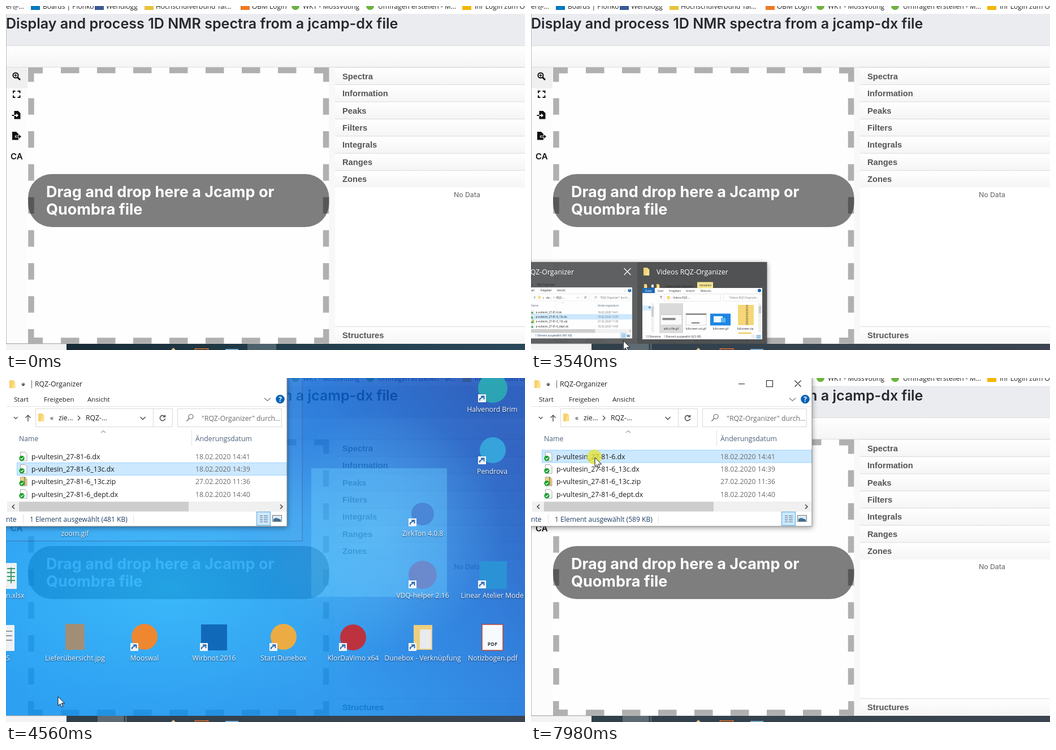
Recreate the animation shown at these times as an HTML page. Size 918 by 610 pixels, loop 8000 ms.

```html
<!DOCTYPE html>
<html lang="en">
<head>
<meta charset="utf-8">
<title>Opening a spectrum file</title>
<style>
html, body { margin: 0; width: 100%; height: 100%; overflow: hidden; background: #fff; }
svg { display: block; width: 918px; height: 610px; }
text { font-family: "Open Sans", "Noto Sans", sans-serif; white-space: pre; }
.head { font-family: Inter, sans-serif; font-weight: 600; }
.drop { font-family: Inter, sans-serif; font-weight: 700; }
.panel { font-family: "Liberation Sans", Arial, sans-serif; font-weight: bold; }
.label { text-shadow: 0 1px 2px rgba(0,20,50,.8); }
.shadow { filter: drop-shadow(0 2px 5px rgba(0,0,0,.4)); }
</style>
</head>
<body>
<svg id="stage" viewBox="0 0 918 610" xmlns="http://www.w3.org/2000/svg"></svg>
<script>
const LOOP = 8000;
const APP = 'RQZ-Organizer';
const FILE = 'p-vultesin_27-81-6';

// Drawing helpers
const rect = (x, y, w, h, fill, more = '') =>
  `<rect x="${x}" y="${y}" width="${w}" height="${h}" fill="${fill}" ${more}/>`;
const dot = (x, y, r, fill, more = '') => `<circle cx="${x}" cy="${y}" r="${r}" fill="${fill}" ${more}/>`;
const text = (x, y, s, size = 12.25, fill = '#222', more = '') =>
  `<text x="${x}" y="${y}" font-size="${size}" fill="${fill}" ${more}>${s}</text>`;
const line = (d, color = '#444', width = 1, more = '') =>
  `<path d="${d}" fill="none" stroke="${color}" stroke-width="${width}" ${more}/>`;
const shape = (d, fill, more = '') => `<path d="${d}" fill="${fill}" ${more}/>`;
const group = (id, body, more = '') => `<g id="${id}" ${more}>${body}</g>`;
const gradient = (id, stops, [x1, y1, x2, y2] = [0, 0, 1, 0]) =>
  `<linearGradient id="${id}" x1="${x1}" y1="${y1}" x2="${x2}" y2="${y2}">` +
  stops.map(([at, c]) => `<stop offset="${at}" stop-color="${c}"/>`).join('') + '</linearGradient>';
const glow = (id, color, opacity) => `<radialGradient id="${id}"><stop offset="0" stop-color="${color}" ` +
  `stop-opacity="${opacity}"/><stop offset="1" stop-color="${color}" stop-opacity="0"/></radialGradient>`;

const defs = '<defs>' +
  gradient('bar', [[0, '#ffffff'], [1, '#f5f5f5']], [0, 0, 0, 1]) +
  gradient('task', [[0, '#142631'], [.5, '#213c49'], [1, '#29485a']]) +
  gradient('taskGrey', [[0, '#2e3f4a'], [.5, '#35434f'], [1, '#3b4450']]) +
  gradient('sky', [[0, '#008cf0'], [.45, '#0785ea'], [.75, '#0666d6'], [1, '#0846b6']], [0, .75, 1, .25]) +
  glow('cyanGlow', '#14b6ff', .75) + glow('lampGlow', '#5cc8ff', .45) + '</defs>';

function bookmarks() {
  const items = [
    [52, '#0079bf', 65, 'Boards | Plonko'], [165, '#3b5998', 177, 'Wendlogg'],
    [253, '#e9c33c', 265, 'Hochschulverbund Tal...'], [423, '#f07a24', 435, 'OBM Login'],
    [512, '#6cb33f', 525, 'WKT - MossVoting', 1], [644, '#6cb33f', 658, 'Umfragen erstellen - M...', 1],
    [815, '#f2b700', 829, 'Ihr Login zum O...']];
  return text(0, 5, 'er@...', 12) + items.map(([cx, color, x, label, round]) =>
    (round ? dot(cx, 0, 7, color) : rect(cx - 8, -9, 16, 16, color)) + text(x, 5, label, 12)).join('');
}

function dropFrame() {
  const c = '#b0b0b0';
  let s = rect(39, 109, 532, 489, '#fefefe');
  for (const y of [114, 593.5]) s += line(`M97 ${y}H514`, c, 10.5, 'stroke-dasharray="32.5 31.5"');
  for (const x of [44.5, 566]) s += line(`M${x} 163.5V545`, c, 10.5, 'stroke-dasharray="29.2 29.3"');
  for (const x of [39, 545]) for (const y of [109, 588]) s += rect(x, y, 26, 10.5, c);
  for (const x of [39, 561]) for (const y of [109, 573]) s += rect(x, y, 10.5, 25.5, c);
  return s + rect(39, 298, 532.5, 94, '#000', 'rx="42" opacity=".5"') +
    text(71, 339, 'Drag and drop here a Jcamp or', 27, '#fff', 'class="drop"') +
    text(71, 370, 'Quombra file', 27, '#fff', 'class="drop"');
}

function sideTools() {
  const k = '#111';
  const sheet = (x, y) => shape(`M${x} ${y - 7}h7l4 4v10.5h-11z`, k);
  return rect(0, 109, 38, 490, '#fcfcfc') + rect(0, 109, 38, 37, '#f0f0f0') +
    dot(17, 123, 4.6, 'none', `stroke="${k}" stroke-width="2"`) +
    line('M20.5 126.5L25 131', k, 2.8) + line('M14.6 123H19.4M17 120.6V125.4', k, 1.3) +
    line('M13 154.5V151H16.5M20.5 151H24.5V154.5M24.5 158.5V162H20.5M16.5 162H13V158.5', k, 2.1) +
    sheet(14.5, 193) + line('M10.5 194H15', k, 2) + line('M14.5 194H19', '#fff', 2) + shape('M18 190.5l4 3.5-4 3.5z', '#fff') +
    sheet(11, 230) + line('M16 231.5H24', '#fff', 3.6) + line('M17 231.5H24', k, 1.8) + shape('M23 228l4 3.5-4 3.5z', k) +
    text(8, 271.5, 'CA', 15, k, 'class="head"');
}

function page() {
  const titles = ['Spectra', 'Information', 'Peaks', 'Filters', 'Integrals', 'Ranges', 'Zones'];
  const header = (y, s) => rect(582, y, 336, 30, 'url(#bar)') + line(`M582 ${y}H918`, '#d9d9d9') +
    text(595, y + 20.6, s, 14.7, '#555', 'class="panel"');
  return rect(0, 0, 918, 610, '#fff') + bookmarks() +
    rect(0, 14, 918, 56, '#ebecf0') + text(0, 40, 'Display and process 1D NMR spectra from a jcamp-dx file', 25.1, '#26282e', 'class="head"') +
    rect(0, 70, 918, 39, 'url(#bar)') + line('M0 70.5H918M0 108.5H918', '#dcdcde') +
    sideTools() + rect(571, 109, 11, 490, '#f8f8f8') + dropFrame() +
    titles.map((s, i) => header(109 + 30.45 * i, s)).join('') +
    text(815.5, 338.5, 'No Data', 12.3, '#777', 'text-anchor="middle" style="font-family:Inter,sans-serif;font-weight:500"') +
    header(568.7, 'Structures') + line('M.5 14V599', '#bbb');
}

const wallpaper = () => rect(0, 0, 918, 600, 'url(#sky)') +
  rect(-150, 130, 880, 480, 'url(#cyanGlow)') + rect(440, 60, 440, 420, 'url(#lampGlow)') +
  rect(540, 160, 240, 228, '#4cc4ff', 'opacity=".4"') +
  rect(-2, -2, 526, 291, '#fff', 'fill-opacity=".05" stroke="#0b4d92" stroke-opacity=".55" stroke-width="1.5"');

function desktopIcons() {
  const label = (x, y, s) => text(x, y, s, 12.2, '#fff', 'text-anchor="middle" class="label"');
  const sheet = (x, y, w, fill = '#f4f4f4', more = '') => rect(x, y, w, 46, fill, 'rx="1" ' + more);
  const apps = [
    [860, 60, 'Halvenord Brim', dot(861, 18, 26, '#2ca7b4')],
    [860, 170, 'Pendrova', dot(861, 128, 23, '#37a5dc')],
    [737, 280, 'ZirkTon 4.0.8', dot(737, 241, 20, '#4a86d6')],
    [737, 390, 'VDQ-helper 2.16', dot(737, 349, 25, '#6c88cc')],
    [860, 390, 'Linear Atelier Mode', rect(837, 325, 49, 49, '#2b93d6')],
    [245, 501, 'Mooswal', dot(245, 459, 23, '#f5862b')],
    [368, 501, 'Wirbnot 2016', rect(345, 437, 46, 46, '#0f68b8')],
    [491, 501, 'Start Dunebox', dot(491, 459, 23, '#f2ad3e')],
    [614, 501, 'KlorDaVimo x64', dot(614, 460, 23, '#c12f3a')],
    [737, 501, 'Dunebox - Verknüpfung', rect(721, 438, 33, 44, '#f3d27c') + rect(732, 446, 20, 34, '#eee')]];
  const shortcut = (x, y) => rect(x, y, 14, 14, '#f8f8f8') +
    line(`M${x + 3} ${y + 11}V${y + 8}L${x + 9} ${y + 4.5}M${x + 5} ${y + 3.5}H${x + 10.5}V${y + 9}`, '#1d5fae', 1.8);
  return apps.map(([x, y, s, icon]) => icon + shortcut(x - 25, y - 31) + label(x, y, s)).join('') +
    label(122, 280, 'zoom.gif') + sheet(-20, 328, 39) +
    line('M2 338H16M2 345H16M2 352H16M2 359H16M9 336V364', '#3d9a63', 2) + text(0, 390, 'n.xlsx', 12.2, '#fff', 'class="label"') +
    sheet(-20, 438, 35) + line('M0 449H11M0 457H11M0 465H11', '#999', 2) + text(0, 501, 'S', 12.2, '#fff', 'class="label"') +
    sheet(105, 436, 34, '#a68e73') + label(122, 501, 'Lieferübersicht.jpg') +
    sheet(842, 437, 37, '#fff', 'stroke="#c8402f" stroke-width="1.5"') +
    text(860.5, 475, 'PDF', 9, '#333', 'text-anchor="middle" font-weight="bold"') + label(861, 501, 'Notizbogen.pdf');
}

const folder = (x, y, s = 1) => `<g transform="translate(${x} ${y}) scale(${s})">` +
  shape('M0 0h7l3 3v11H0z', '#f7d16f') + shape('M7 3h3.5v11H4z', '#fbe08f') + '</g>';

function explorer() {
  const grey = '#6d6d6d', blue = '#4c607a';
  const rows = [['.dx', '18.02.2020 14:41'], ['_13c.dx', '18.02.2020 14:39'],
    ['_13c.zip', '27.02.2020 11:36'], ['_dept.dx', '18.02.2020 14:40']];
  const row = ([end, date], i) => {
    const y = 139.5 + 22.1 * i, zip = end.endsWith('zip');
    return shape(`M25.5 ${y - 8}h8l3.5 3.5v12h-11.5z`, zip ? '#f4d273' : '#fff', 'stroke="#a5a5a5"') +
      (zip ? line(`M33 ${y - 8}v15`, '#777', 2.4, 'stroke-dasharray="2 1"') : '') +
      dot(28, y + 3, 4.7, '#16a02c') + line(`M25.8 ${y + 3}l1.7 1.8 3-3.4`, '#fff', 1.3) +
      text(45, y + 4.7, FILE + end, 12.25, '#1a1a1a') + text(335, y + 4.7, date, 12.25, grey);
  };
  return rect(-4, 23, 501, 240, '#fff') + folder(6, 4) +
    shape('M27 11h7l-3.5 3.5z', '#333') + line('M28 9.5H33', '#333') + line('M45.5 4V18', '#666') + text(51, 15, APP) +
    text(14, 42, 'Start', 11.6) + text(67, 42, 'Freigeben', 11.6) + text(144, 42, 'Ansicht', 11.6) +
    line('M457 35.5l5.5 5 5.5-5', '#777', 1.2) + dot(485, 37.5, 7.8, '#0a64b4') +
    text(485, 42, '?', 12, '#fff', 'text-anchor="middle" font-weight="bold"') +
    line('M0 50.5H497', '#e2e2e2') +
    line('M14 69l3.3 3.3 3.3-3.3', '#555', 1.4) + line('M39 77V66M34.5 70.5L39 66l4.5 4.5', '#555', 1.5) +
    line('M52.5 54.5H294.5V86.5H52.5ZM260.5 54.5V86.5M303.5 54.5H487.5V86.5H303.5Z', '#d9d9d9') +
    folder(57, 63) + text(78, 75, '«', 12) + text(93, 75, 'zie...') + line('M127 67l4 4-4 4', '#444', 1.3) + text(141, 75, 'RQZ-...') +
    line('M237.5 69l4.5 4.5 4.5-4.5', '#444', 1.4) + line('M280.5 68a4.6 4.6 0 1 0 1 4M281.5 65.5v3.5h-4', '#555', 1.6) +
    dot(327, 68.5, 4, 'none', 'stroke="#666" stroke-width="1.2"') + line('M324 71.5L319.5 76.5', '#666', 1.3) +
    text(346, 76, `"${APP}" durch...`, 12.2, grey) +
    line('M168 97l4-3.5 4 3.5', '#666') + text(23, 112, 'Name', 12.25, blue) +
    line('M328.5 92V121', '#e2e2e2') + text(335, 112, 'Änderungsdatum', 12.25, blue) +
    rect(19.5, 0, 477, 22, '#e5f3ff', 'class="hover"') +
    rect(19.5, 0, 477, 22, '#cce8ff', 'class="picked" stroke="#99d1ff"') +
    rows.map(row).join('') +
    rect(2, 219, 494, 18, '#f0f0f0') + rect(23, 219.5, 300, 17, '#cdcdcd') +
    line('M15 224.5l-4 3.7 4 3.7M485 224.5l4 3.7-4 3.7', '#444', 1.5) +
    text(0, 255, 'nte', 12.1, '#1f3f63') + text(42, 255, '1 Element ausgewählt (481 KB)', 12.1, '#1f3f63', 'class="status"') +
    line('M30.5 242V258M225.5 242V258', '#e2e2e2') +
    rect(443.5, 237.5, 24, 24, '#cce8ff', 'stroke="#5aa9dd"') +
    line('M449 244.5H454M456 244.5H463M449 248H454M456 248H463M449 251.5H454M456 251.5H463M449 255H454M456 255H463', '#5b6b78', 1.2) +
    rect(471.5, 243.5, 16, 11, '#dcebf7', 'stroke="#777"') + shape('M473 250l5-2 8 3v3H473z', '#3f6f96');
}

function gallery() {
  const tiny = (x, y, s, fill = '#333', size = 4.6) => text(x, y, s, size, fill);
  const names = ['add a file.gif', 'fullscreen out.gif', 'fullscreen.gif', 'fullscreen.zip'];
  return rect(197, 500, 212, 91, '#fff') +
    folder(200, 493, .5) + rect(213, 494, 4, 5, '#eee') + folder(222, 493, .5) + tiny(236, 499, '| Videos ' + APP, '#222') +
    rect(294, 489.5, 28, 11, '#f5e58c') + tiny(298, 497, 'Verwalten') +
    rect(197, 500, 22, 9, '#1966b3') + tiny(202, 506.5, 'Datei', '#fff') +
    tiny(224, 506.5, 'Start') + tiny(244, 506.5, 'Freigeben') + tiny(274, 506.5, 'Ansicht') + tiny(300, 506.5, 'Bildtools') +
    dot(404, 504.5, 3, '#0a64b4') + line('M197 510.5H409', '#e2e2e2', .6) +
    line('M230 519.5V514M228 516l2-2 2 2', '#555', .7) + line('M235.5 510.5H335.5V523.5H235.5ZM340.5 510.5H407.5V523.5H340.5Z', '#ddd', .6) +
    folder(241, 514, .45) + tiny(249, 519, '› Videos RQZ-...') + tiny(350, 519, `"Videos ${APP}...`, '#777') +
    rect(197, 531, 21, 9, '#d6ebfb') + shape('M207 533h5l-2 4z', '#3b8ad0') + rect(212.5, 527, 5, 52, '#f0f0f0') + rect(213, 533, 4, 18, '#cdcdcd') +
    rect(227, 527, 42, 53, '#d9d9d9') + rect(230, 546, 36, 19, '#fafafa') + rect(232, 553, 24, 4, '#888', 'rx="2"') + line('M230 547H266', '#aaa', 1.2) +
    rect(274, 545, 36, 21, '#fdfdfd', 'stroke="#bbb" stroke-width=".6"') + line('M274 546.5H310', '#444', 1.6) + rect(284, 561, 14, 2, '#777') +
    rect(317, 545.5, 36, 21, '#1683e4') + rect(323, 550, 16, 11, '#f2f8ff') + rect(336, 553, 8, 8, '#58b3f5') +
    rect(366, 530, 28, 36, '#f6d574') + line('M382 530V566', '#a8924a', 4, 'stroke-dasharray="2 1.2"') +
    names.map((s, i) => text(248 + 43.7 * i, 573.5, s, 4.7, '#222', 'text-anchor="middle"')).join('') +
    line('M367 580H390', '#f0c54a', 2) + rect(402, 527, 6, 52, '#f0f0f0') + rect(402.5, 532, 5, 13, '#cdcdcd') +
    tiny(203, 587.5, '13 Elemente') + tiny(235, 587.5, '1 Element ausgewählt (623 KB)') +
    rect(389.5, 583, 7, 7, '#eee') + rect(398.5, 583, 8, 7, '#9cc9ea');
}

const popup = () => rect(-8, 454, 425.5, 150, '#4b4d4e', 'class="shadow"') +
  rect(0, 454, 188, 145, '#fff', 'id="popupHover" opacity=".08"') +
  text(-9, 476, APP, 12.4, '#fff') +
  line('M164.5 465l12 12M176.5 465l-12 12', '#fff', 1.3, 'id="popupClose"') +
  folder(199, 464, .98) + text(222, 476, 'Videos ' + APP, 12.4, '#fff') +
  '<use href="#explorer" transform="translate(-8.4 490.3) scale(.377)"/>' + gallery();

const taskbar = () => rect(0, 599, 918, 11, 'url(#task)', 'id="taskBase"') +
  rect(427, 599, 51, 11, '#fff', 'id="taskActive" opacity=".2"') +
  rect(162, 599, 46.5, 11, '#fff', 'id="taskHover"') + rect(211, 599, 2.5, 11, '#fff', 'id="taskStack" opacity=".2"') +
  rect(0, 599, 107, 11, '#f3f3f3') + line('M0 598.8H107', '#999') +
  shape('M292 610l4-4 4 4z', '#e2c290') + line('M334.5 610V607.7H357.5V610', '#e8702a', 1.6) + rect(388, 608.3, 23, 2, '#86bfe8');

const stage = document.getElementById('stage');
stage.innerHTML = defs + page() + group('wallpaper', wallpaper()) + group('icons', desktopIcons()) +
  group('window', rect(-4, -4, 501, 30, '#fff') + group('explorer', explorer()) +
    group('buttons', line('M367 10.5H378M416.5 4.5H427.5V15.5H416.5ZM466.5 4.5l11 11M477.5 4.5l-11 11', '#222', 1.1)) +
    line('M497 0V263H0', '#8c8c8c', 1), 'class="shadow"') +
  group('popup', popup()) + taskbar() + dot(0, 0, 13, '#e6e32e', 'id="halo" opacity=".75"') +
  group('cursor', shape('M0 0V16.2L3.8 12.7L6.4 18.6L8.9 17.5L6.3 11.8H11.6Z', '#fff', 'stroke="#111" stroke-linejoin="round"'));

// Timing helpers
const $ = id => document.getElementById(id);
const show = (id, on) => $(id).setAttribute('visibility', on ? 'visible' : 'hidden');
const fade = (id, v) => { $(id).setAttribute('opacity', v); show(id, v > 0); };
const place = (id, [x, y]) => $(id).setAttribute('transform', `translate(${x} ${y})`);
const mix = (a, b, u) => a.map((v, i) => v + (b[i] - v) * u);
const hold = (t, first, keys) => keys.reduce((v, [at, next]) => t >= at ? next : v, first);
const steps = (t, from, to, n) => t < from ? 0 : Math.min(n, 1 + Math.floor((t - from) / (to - from) * (n - 1)));

const TASK = [192, 605], THUMB = [92, 565], BELOW = [130, 190], ROW2 = [126, 160], ROW1 = [113, 141];

function cursorAt(t) {
  if (t < 2580) {
    const k = steps(t, 460, 1000, 8);
    if (k < 1 || k > 7) return null;
    const u = (k - 1) / 6;
    return [303 - 88 * u, 601 - 48 * u * (1 - u) + 5 * u];
  }
  if (t < 4150) return mix(TASK, THUMB, steps(t, 3450, 3930, 7) / 7);
  if (t < 6080) {
    const u = steps(t, 5170, 5870, 10) / 10;
    return mix(THUMB, BELOW, u * u * (3 - 2 * u));
  }
  const k = steps(t, 6080, 6490, 6);
  return k < 3 ? mix(BELOW, ROW2, k / 2) : mix(ROW2, ROW1, (k - 2) / 4);
}

function draw(t) {
  const cursor = cursorAt(t);
  show('cursor', cursor);
  if (cursor) place('cursor', cursor);
  const clicking = (t >= 2580 && t < 2750) || (t >= 7220 && t < 7370) || t >= 7980;
  show('halo', clicking);
  if (clicking) place('halo', t < 3000 ? [191, 605] : [112, 140]);

  const greyed = t >= 2750;
  $('taskBase').setAttribute('fill', greyed ? 'url(#taskGrey)' : 'url(#task)');
  show('taskActive', !greyed);
  show('taskStack', greyed);
  fade('taskHover', hold(t, 0, [[1460, .07], [1720, .1], [1795, .13], [1870, .16], [2180, .13], [2270, .16], [2750, .22]]));

  fade('popup', hold(t, 0, [[2750, .4], [2820, .83], [2920, .93], [2990, .97], [4560, 0]]));
  place('popup', [0, hold(t, 12, [[2820, 4.5], [2920, 1.5], [2990, 0]])]);
  const overThumb = t >= 3450 && t < 4560 && cursor[1] < 596;
  show('popupHover', overThumb);
  show('popupClose', overThumb);

  const peek = hold(t, 0, [[4150, .05], [4260, .22], [4340, .42], [4410, .6], [4490, .74], [4560, .82], [4700, .3], [4780, 0]]);
  fade('wallpaper', peek);
  fade('icons', peek * 1.18);
  show('buttons', t >= 4780);
  $('window').style.display = t >= 4150 ? '' : 'none';

  const first = t >= 7220;
  const hovered = t >= 5170 ? Math.floor((cursor[1] - 128.4) / 22.1) : -1;
  for (const el of stage.querySelectorAll('.picked')) el.setAttribute('y', first ? 128 : 150.3);
  for (const el of stage.querySelectorAll('.hover')) {
    el.setAttribute('y', 128 + 22.1 * hovered);
    el.setAttribute('fill-opacity', hovered >= 0 && hovered < 4 ? 1 : 0);
  }
  stage.querySelector('.status').textContent = `1 Element ausgewählt (${first ? 589 : 481} KB)`;
}

function frame() {
  draw(performance.now() % LOOP);
  requestAnimationFrame(frame);
}
frame();
</script>
</body>
</html>
```
